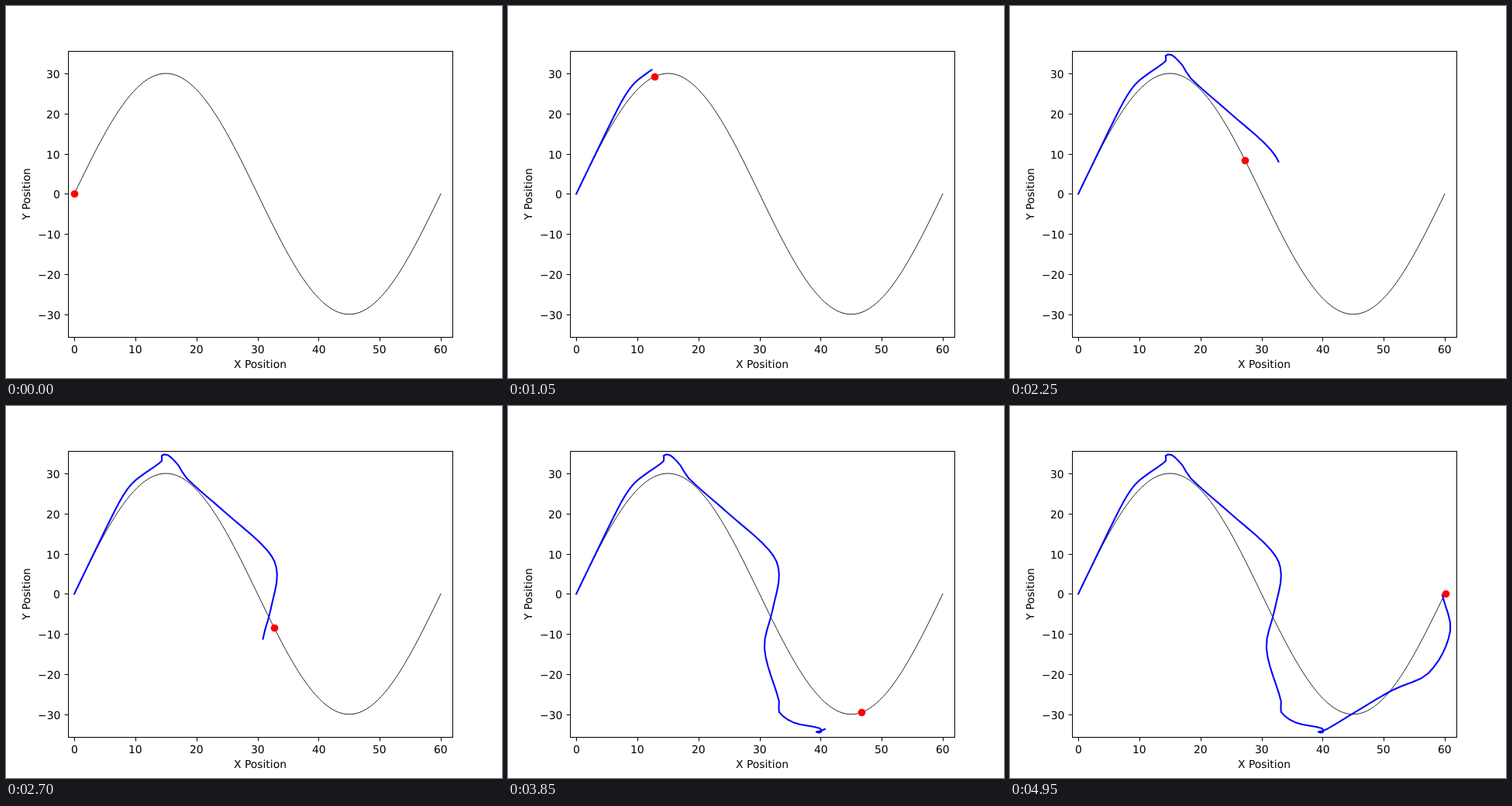
Recreate the animation shown at these times as an HTML page with a canvas. Size 640x480 px, loop 5 s.

```html
<!DOCTYPE html>
<html lang="en">
<head>
<meta charset="utf-8">
<title>Path tracking</title>
<style>
  html, body { margin: 0; width: 100%; height: 100%; overflow: hidden; background: #fff; }
  canvas { display: block; }
</style>
</head>
<body>
<canvas id="stage" width="640" height="480"></canvas>
<script>
const ctx = document.getElementById('stage').getContext('2d');
const STEPS = 100, STEP_MS = 50;
const PT = 100 / 72;
const px = x => 88.1 + 7.882 * x;
const py = y => 242.4 - 5.18 * y;
const wave = phase => 30 * Math.sin(2 * Math.PI * phase);
const snap = v => Math.round(v) + 0.5;
const steps = rule => Array.from({ length: STEPS }, (_, i) => rule(i));

// Turning points of the follower: step, x, y
const KEYS = [
  [0, 0, 0], [10, 6.1, 19.1], [13, 8, 24.5], [16, 9.6, 27.7], [20, 11.7, 30.2],
  [24, 14.3, 33.1], [26, 14.3, 34.4], [28, 15.3, 34.6], [31, 17.1, 31.9],
  [33, 18.4, 28.8], [38, 24.7, 20.3], [43, 31.5, 11], [47, 33.2, 4.9],
  [51, 32.1, -4.2], [55, 30.8, -13.5], [61, 33.2, -26.8], [63, 33.2, -29.4],
  [66, 35.5, -32], [70, 39.9, -33.5], [72, 40, -34.5], [74, 39.3, -34.4],
  [77, 40.7, -33.7], [81, 45.3, -29.5], [85, 51.4, -24], [89, 57.3, -19.8],
  [95, 60.9, -9.2], [99, 59.6, -0.3]
];

function slope(i, axis) {
  const a = KEYS[Math.max(i - 1, 0)];
  const b = KEYS[Math.min(i + 1, KEYS.length - 1)];
  return (b[axis] - a[axis]) / (b[0] - a[0]);
}

// Cubic Hermite interpolation between neighbouring keys
function follow(step, axis) {
  const i = Math.max(1, KEYS.findIndex(k => k[0] >= step));
  const a = KEYS[i - 1], b = KEYS[i];
  const span = b[0] - a[0], t = (step - a[0]) / span, u = 1 - t;
  return u * u * (1 + 2 * t) * a[axis] + t * t * (1 + 2 * u) * b[axis]
    + span * t * u * (u * slope(i - 1, axis) - t * slope(i, axis));
}

const track = steps(i => [px(follow(i, 1)), py(follow(i, 2))]);
const curve = steps(i => {
  const phase = i / (STEPS - 1);
  return [px(60 * phase), py(wave(phase))];
});

function polyline(points, color, width) {
  ctx.strokeStyle = color;
  ctx.lineWidth = width;
  ctx.beginPath();
  for (const [x, y] of points) ctx.lineTo(x, y);
  ctx.stroke();
}

// Text starts on a whole pixel
function label(text, x, y, anchor) {
  ctx.fillText(text, Math.round(x - anchor * ctx.measureText(text).width), y);
}

function drawAxes() {
  ctx.lineCap = 'butt';
  ctx.lineJoin = 'miter';
  ctx.fillStyle = '#000';
  ctx.font = `${10 * PT}px "DejaVu Sans", sans-serif`;
  ctx.textRendering = 'geometricPrecision';
  for (let v = 0; v <= 60; v += 10) {
    const x = snap(px(v));
    polyline([[x, 427], [x, 432.4]], '#000', 1);
    label(String(v), px(v), 448, 0.5);
  }
  for (let v = -30; v <= 30; v += 10) {
    const y = snap(py(v));
    polyline([[75.6, y], [80, y]], '#000', 1);
    label(String(v).replace('-', '\u2212'), 69.8, y + 5.5, 1);
  }
  ctx.strokeRect(80.5, 58.5, 496, 369);
  label('X Position', 328, 467, 0.5);
  ctx.save();
  ctx.translate(31, 243);
  ctx.rotate(-Math.PI / 2);
  label('Y Position', 0, 0, 0.5);
  ctx.restore();
}

function drawDot(step) {
  const x = snap(px(0.6067 * step)), y = snap(py(wave(step / (STEPS - 1))));
  ctx.fillStyle = '#f00';
  ctx.beginPath();
  ctx.arc(x, y, 3.5 * PT, 0, 2 * Math.PI);
  ctx.fill();
}

function draw(step) {
  ctx.fillStyle = '#fff';
  ctx.fillRect(0, 0, 640, 480);
  drawAxes();
  ctx.lineJoin = 'round';
  ctx.lineCap = 'square';
  polyline(curve, '#000', 0.85);
  if (step > 0) polyline(track.slice(0, step + 1), '#00f', 1.5 * PT);
  drawDot(step);
}

function tick() {
  draw(Math.floor(performance.now() / STEP_MS) % STEPS);
  requestAnimationFrame(tick);
}
tick();
</script>
</body>
</html>
```
